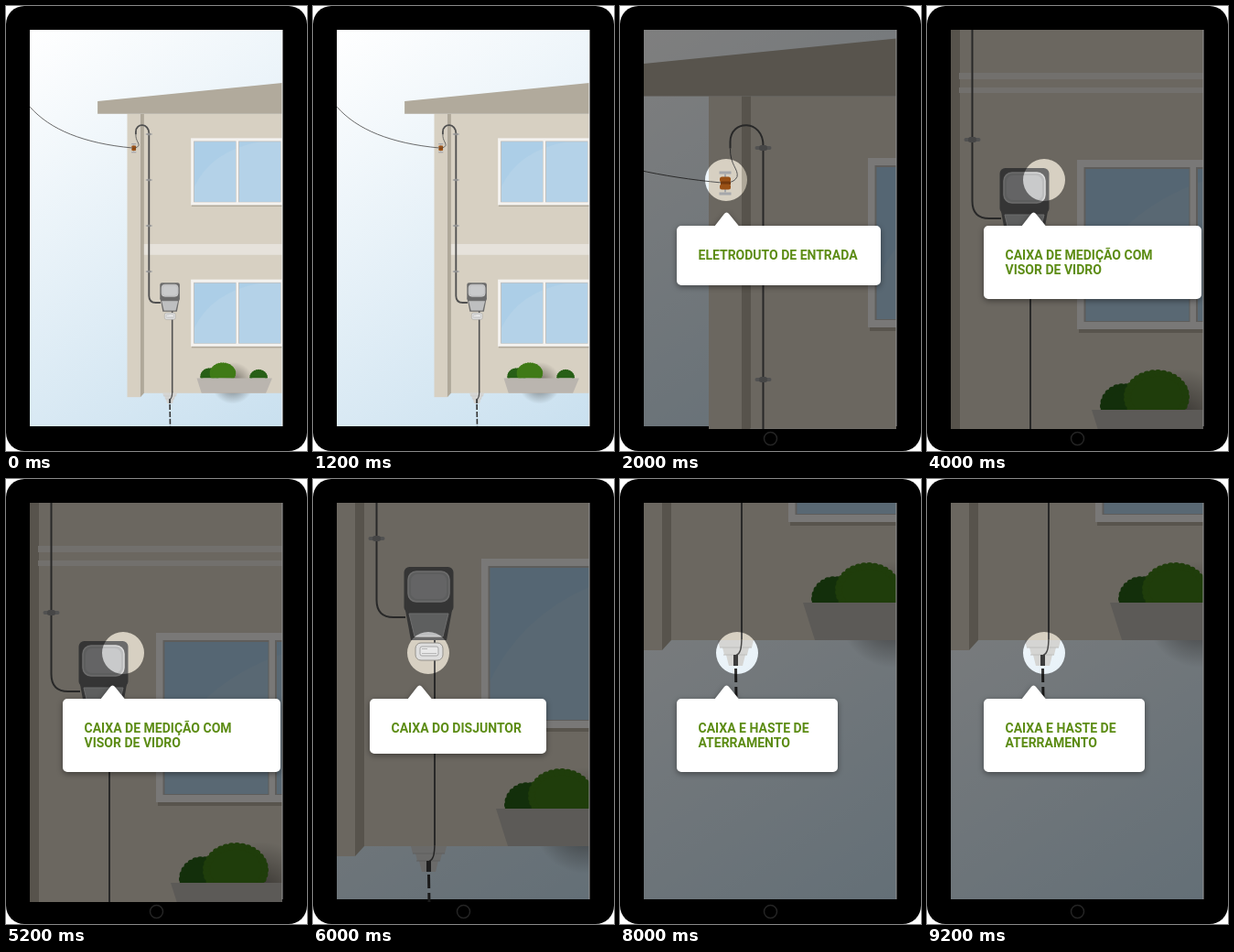
Animation, 329 px wide and 486 px high, one loop 10000 ms. Source, as an HTML page with a canvas:

```html
<!DOCTYPE html>
<html lang="pt-BR">
<head>
<meta charset="utf-8">
<title>Padrão de entrada de energia</title>
<style>
html, body { margin: 0; width: 100%; height: 100%; overflow: hidden; background: #fff; }
canvas { display: block; width: 329px; height: 486px; }
</style>
</head>
<body>
<canvas id="stage"></canvas>
<script>
const W = 329, H = 486, STEP = 2000;
const canvas = document.getElementById('stage');
const c = canvas.getContext('2d');
const dpr = window.devicePixelRatio || 1;
canvas.width = W * dpr;
canvas.height = H * dpr;

// View offset of the house, spotlight centre, tooltip size and lines.
const views = [
  { wide: true },
  { x: 87, y: 469.5, spot: 116, w: 223, h: 65, text: ['ELETRODUTO DE ENTRADA'] },
  { x: -20, y: 81, spot: 128, w: 238, h: 80, text: ['CAIXA DE MEDIÇÃO COM', 'VISOR DE VIDRO'] },
  { x: 0, y: 0, spot: 126, w: 193, h: 60, text: ['CAIXA DO DISJUNTOR'] },
  { x: 0, y: -225, spot: 128, w: 176, h: 80, text: ['CAIXA E HASTE DE', 'ATERRAMENTO'] }
];

function rect(x, y, w, h, fill) {
  c.fillStyle = fill;
  c.fillRect(x, y, w, h);
}

function round(x, y, w, h, r, fill, stroke, lw = 1) {
  c.beginPath();
  c.roundRect(x, y, w, h, r);
  if (fill) { c.fillStyle = fill; c.fill(); }
  if (stroke) { c.strokeStyle = stroke; c.lineWidth = lw; c.stroke(); }
}

function poly(points, fill, stroke) {
  c.beginPath();
  points.forEach(([x, y]) => c.lineTo(x, y));
  c.closePath();
  c.fillStyle = fill;
  c.fill();
  if (stroke) { c.strokeStyle = stroke; c.lineWidth = 1; c.stroke(); }
}

function line(d, color, lw) {
  c.strokeStyle = color;
  c.lineWidth = lw;
  c.stroke(new Path2D(d));
}

function sky() {
  const g = c.createLinearGradient(26, 26, 302, 459);
  g.addColorStop(0, '#ffffff');
  g.addColorStop(1, '#c9e0ef');
  rect(26, 26, 276, 433, g);
}

function windowAt(y) {
  rect(186, y + 3, 255, 186, 'rgba(90,80,65,.3)');
  rect(184, y, 255, 185, '#f4f2ef');
  for (const x of [193.5, 316]) {
    rect(x - 2, y + 8, 116, 169, '#bdbbb8');
    rect(x, y + 10, 113, 166, '#b4d2e8');
  }
  // Soft reflection sweeping across both panes
  c.save();
  c.beginPath();
  c.rect(193.5, y + 10, 113, 166);
  c.rect(316, y + 10, 113, 166);
  c.clip();
  c.fillStyle = 'rgba(160,200,228,.4)';
  c.fill(new Path2D(`M193 ${y + 10}H372Q240 ${y + 35} 193 ${y + 135}Z`));
  c.restore();
}

function bush(x, y, rx, ry, fill) {
  c.save();
  c.beginPath();
  c.rect(x - rx - 6, y - ry - 8, rx * 2 + 12, 368 - y + ry);
  c.clip();
  c.fillStyle = fill;
  c.beginPath();
  c.ellipse(x, y, rx - 2, ry - 2, 0, 0, 7);
  c.fill();
  const n = Math.round((rx + ry) / 2);
  for (let i = 0; i < n; i++) {
    const a = i / n * Math.PI * 2;
    c.beginPath();
    c.arc(x + Math.cos(a) * (rx - 4), y + Math.sin(a) * (ry - 4), 4, 0, 7);
    c.fill();
  }
  c.restore();
}

function planter() {
  const g = c.createRadialGradient(298, 373, 5, 298, 373, 58);
  g.addColorStop(0, 'rgba(50,45,40,.6)');
  g.addColorStop(1, 'rgba(50,45,40,0)');
  rect(238, 313, 120, 120, g);
  bush(235, 356, 26, 25, '#275f16');
  bush(369, 358, 25, 23, '#275f16');
  bush(271, 346, 36, 30, '#3f7a16');
  poly([[200, 360], [406, 360], [389, 401], [213, 401]], '#bab5af');
}

function building(wide) {
  rect(10, -371, 36, 783, '#d7d0c2');
  rect(55, -371, 390, 772, '#d7d0c2');
  poly([[46, -371], [56, -371], [56, 401], [46, 412]], '#afa899');
  poly([[-71, -405.5], [434, -456], [434, -371], [-71, -371]], '#b1aa9c');
  if (wide) {
    rect(56, -11, 390, 30, '#e6e2db');
  } else {
    rect(55, -8, 390, 7, '#e6e2db');
    rect(55, 8, 390, 6, '#e6e2db');
  }
  windowAt(-303.5);
  windowAt(87);
  planter();
}

function insulator() {
  rect(27, -286, 2, 20, '#a5a7ab');
  rect(21.5, -289, 13, 3, '#a5a7ab');
  rect(21.5, -266, 13, 3, '#a5a7ab');
  round(22, -283, 12, 6, 2.5, '#9a5116');
  round(23, -278, 11, 4, 1, '#74390d');
  round(22, -275, 12, 6, 2.5, '#9a5116');
}

function meter() {
  poly([[100, 138], [153, 138], [146, 176], [107, 176]], '#6b6b6b');
  round(99.5, 96, 54, 50, 6, '#6b6b6b');
  round(104, 101, 45, 33, 9, '#bcbdbe', '#dcdcdc', 1.5);
  round(107, 104, 39, 27, 7, '#c9cacb');
  poly([[105, 147], [148, 147], [142, 172], [111, 172]], '#bebfc0', '#dcdcdc');
}

function breaker() {
  round(112, 179, 30, 19, 6, '#dedede', '#94918b');
  round(117, 183, 20, 10, 2, '#e8e8e8', '#a5a5a5');
  line('M119 185.500H125M119 190.500H135', '#b5b5b5', 1);
}

function groundBox(wide) {
  poly([[107, 401], [146, 401], [144, 409], [141, 409], [139, 417], [137, 417],
    [134, 429], [119, 429], [116, 417], [114, 417], [112, 409], [109, 409]], '#d5d5d3');
  line('M109 409H144M113 417H139', '#bebebc', 1);
  line('M133 397C133 412 131 416 126.500 418', '#484848', wide ? 3 : 1.5);
  rect(124, 417, 5, 12, '#3c3c3c');
  c.setLineDash([15, 5]);
  line('M126.500 432L127.500 495', '#333', wide ? 4 : 3);
  c.setLineDash([]);
}

function wiring(wide) {
  const pipe = wide ? 4.6 : 2;
  const wire = wide ? 2.2 : 1;
  line('M-256 -390C-201 -327 -109 -289 24 -276.500', '#555', wire);
  line('M33.500 -314C33 -296 43 -291 41 -283Q38 -277 31 -277', '#555', wire);
  line('M33.500 -314V-321C33.500 -346 69.500 -346 69.500 -317V132Q69.500 151 88 151H101', '#505050', pipe);
  for (let i = 0; i < 4; i++) {
    const y = 65 - i * 126.5;
    round(60.5, y - 2, 18, 4, 2, '#a3a3a3');
    round(65, y - 3, 9, 6, 2.5, '#8e8e8e');
  }
  line('M133 174V400', '#505050', wide ? 4 : 2);
  insulator();
}

function house(v) {
  c.save();
  if (v.wide) c.transform(0.4, 0, 0, 0.3953, 128.5, 264.3);
  else c.translate(v.x, v.y);
  building(v.wide);
  groundBox(v.wide);
  wiring(v.wide);
  meter();
  breaker();
  c.restore();
}

function shade(v) {
  c.beginPath();
  c.rect(26, 26, 276, 436);
  c.arc(v.spot, 190, 23, 0, Math.PI * 2);
  c.fillStyle = 'rgba(0,0,0,.5)';
  c.fill('evenodd');
}

function tooltip(v) {
  c.save();
  c.shadowColor = 'rgba(0,0,0,.4)';
  c.shadowBlur = 6 * dpr;
  c.shadowOffsetY = 2 * dpr;
  const box = new Path2D('M103 241L113.500 227.500Q116.500 223.500 119.500 227.500L130.500 241Z');
  box.roundRect(62, 240, v.w, v.h, 5);
  c.fillStyle = '#fff';
  c.fill(box);
  c.restore();
  c.fillStyle = '#5c8c14';
  c.font = '700 14px Roboto, sans-serif';
  v.text.forEach((s, i) => c.fillText(s, 85.5, 277 + i * 16));
}

function draw(v) {
  c.setTransform(dpr, 0, 0, dpr, 0, 0);
  rect(0, 0, W, H, '#fff');
  round(0, 0, W, H, 20, '#000');
  c.save();
  c.beginPath();
  c.rect(26, 26, 276, v.wide ? 433 : 436);
  c.clip();
  sky();
  house(v);
  if (!v.wide) shade(v);
  c.restore();
  rect(301.5, 26, 1, 433, v.wide ? '#f4f4f4' : '#999');
  if (v.wide) return;
  c.beginPath();
  c.arc(164.5, 472.5, 7, 0, Math.PI * 2);
  c.strokeStyle = '#242424';
  c.lineWidth = 1.5;
  c.stroke();
  tooltip(v);
}

const start = performance.now();
function tick() {
  const t = performance.now() - start;
  draw(views[Math.floor(t / STEP) % views.length]);
  requestAnimationFrame(tick);
}
tick();
</script>
</body>
</html>
```
